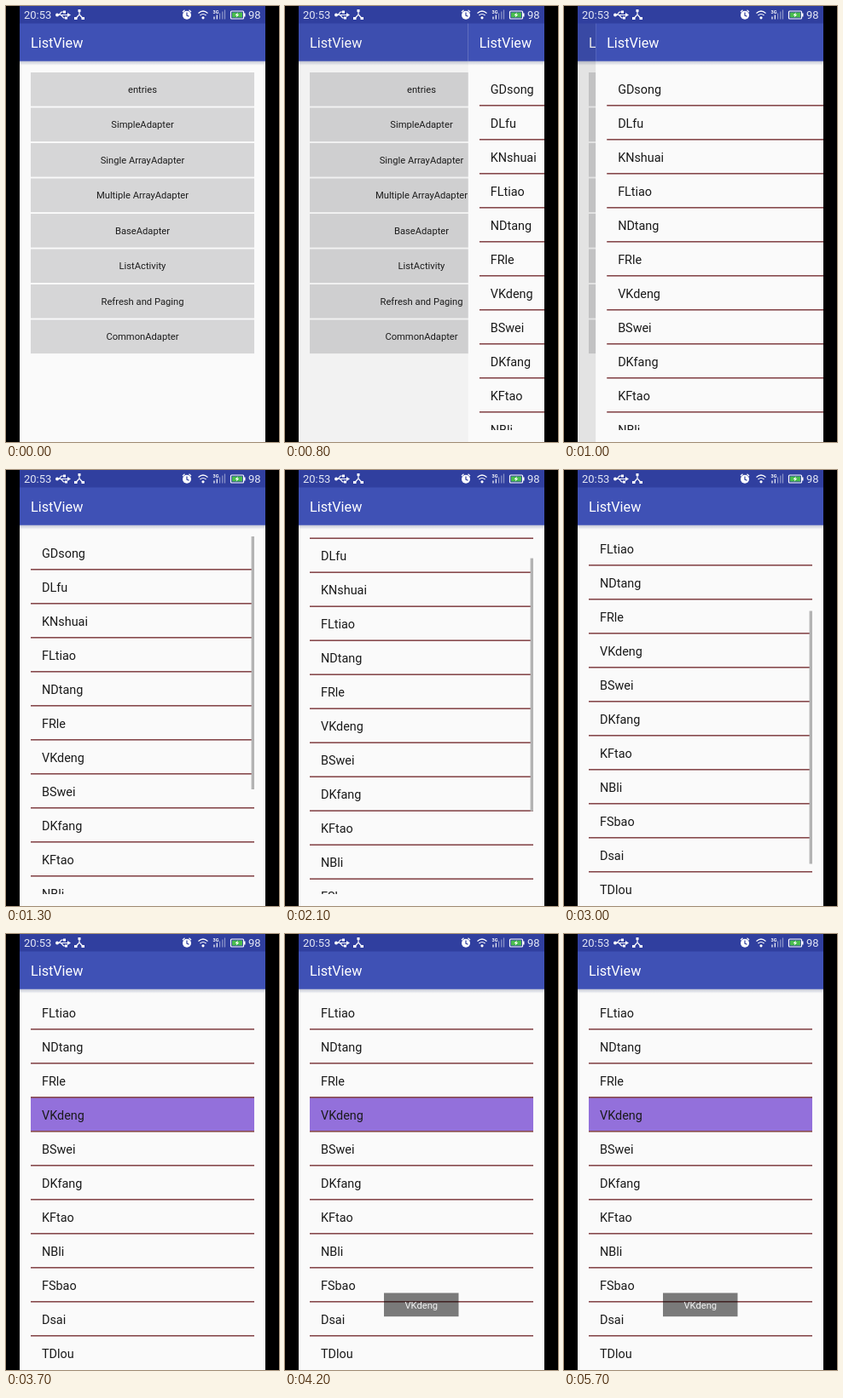
Recreate the animation shown at these times as an HTML page. Size 320 by 512 pixels, loop 5800 ms.

```html
<!DOCTYPE html>
<html lang="en">
<head>
<meta charset="utf-8">
<title>ListView</title>
<style>
  html, body { margin: 0; width: 100%; height: 100%; overflow: hidden; background: #000; }
  svg { display: block; width: 100vw; height: 100vh; font-family: Roboto, "Noto Sans", sans-serif; }
  .title { font-size: 16.2px; fill: #fff; }
  .button { font-size: 11.2px; fill: #1c1c1c; text-anchor: middle; }
  .row { font-size: 14.4px; fill: #1a1a1a; }
  .status { font-size: 13px; fill: #e4e7f5; }
  .icon { fill: none; stroke: #fff; stroke-width: 1.2; }
  .solid { fill: #fff; stroke: none; }
</style>
</head>
<body>
<svg viewBox="0 0 320 512">
  <defs>
    <linearGradient id="shade" x2="0" y2="1">
      <stop stop-color="#1a2a60" stop-opacity=".24"/>
      <stop offset="1" stop-color="#1a2a60" stop-opacity="0"/>
    </linearGradient>
    <clipPath id="phone"><rect x="16" width="288" height="512"/></clipPath>
    <clipPath id="listBox"><rect x="29" y="78" width="262" height="420"/></clipPath>
    <clipPath id="firstButton"><rect x="29" y="78" width="262" height="39.6"/></clipPath>
    <g id="page">
      <rect x="16" y="20" width="288" height="492" fill="#fafafa"/>
      <rect x="16" y="64.800" width="288" height="5" fill="url(#shade)"/>
      <rect x="16" y="20" width="288" height="44.800" fill="#3f51b5"/>
      <text class="title" x="29" y="49">ListView</text>
    </g>
  </defs>
  <rect width="320" height="512"/>
  <g clip-path="url(#phone)">
    <use href="#page"/>
    <g id="menu"></g>
    <circle id="ripple" cx="160" cy="98" clip-path="url(#firstButton)"/>
    <rect id="dim" x="16" y="20" width="288" height="492"/>
    <g id="screen">
      <use href="#page"/>
      <g clip-path="url(#listBox)">
        <g id="rows">
          <rect id="selected" x="29" width="262" height="40" fill="#9370db"/>
        </g>
        <rect id="scrollbar" x="287.6" width="3.4" height="297" fill="#b3b3b3"/>
      </g>
    </g>
    <g id="toast">
      <rect x="116" y="421.5" width="87.5" height="27.7" opacity=".51"/>
      <text x="159.8" y="440" font-size="11.2" fill="#f2f2f2" text-anchor="middle">VKdeng</text>
    </g>

    <rect x="16" width="288" height="20.5" fill="#303f9f"/>
    <text class="status" x="21" y="15">20:53</text>
    <text class="status" x="284" y="15">98</text>
    <g class="icon">
      <path d="M59 10.5H73M62 10.5l3-3.5h3M64.5 10.5l3 3.5h3"/>
      <circle class="solid" cx="60" cy="10.5" r="2"/>
      <path class="solid" d="M72 8l4 2.5-4 2.5zM67 5.5h3v3h-3zM69 12.5h3v3h-3z"/>
      <path d="M86 5v5l-4.5 5M86 10l4.5 5"/>
      <path class="solid" d="M84.5 4h3v3h-3zM80 13h3.5v3h-3.5zM88.5 13h3.5v3h-3.5z"/>
      <circle class="solid" cx="212" cy="10.7" r="5"/>
      <path d="M207 7l2.5-2.3M217 7l-2.5-2.3"/>
      <path d="M212 7.5v3.5l2.5 1.2" stroke="#303f9f"/>
      <path d="M225.5 8.5q5.5-5 11 0M227.5 11q3.5-3 7 0"/>
      <circle class="solid" cx="231" cy="13.8" r="1.6"/>
      <path d="M244 12.5v3M247.3 10.5v5"/>
      <path d="M250.6 8.5v7M253.8 6.5v9M256.5 4.5v11" opacity=".45"/>
      <text x="242.5" y="8.5" font-size="5.5" font-weight="700" class="solid">3G</text>
      <rect x="263.5" y="6" width="15" height="9" rx="1"/>
      <path class="solid" d="M279 8.5h1.5v4H279z"/>
      <path fill="#49bd4d" stroke="none" d="M265 7.5h12v6h-12z"/>
      <path class="solid" d="M272 7.5l-3.5 3.500h2l-.8 2.500 3.500-3.500h-2z"/>
    </g>
  </g>
</svg>
<script>
const LOOP = 5800, STEP = 100;
const ROW = 40, FIRST = 98, SCROLL_END = 125, SELECTED = 6;
const BUTTONS = ["entries", "SimpleAdapter", "Single ArrayAdapter", "Multiple ArrayAdapter",
  "BaseAdapter", "ListActivity", "Refresh and Paging", "CommonAdapter"];
const NAMES = ["GDsong", "DLfu", "KNshuai", "FLtiao", "NDtang", "FRle", "VKdeng",
  "BSwei", "DKfang", "KFtao", "NBli", "FSbao", "Dsai", "TDlou"];

const $ = id => document.getElementById(id);
const set = (el, attrs) => {
  for (const key in attrs) el.setAttribute(key, attrs[key]);
};
const add = (parent, tag, attrs, text = "") => {
  const el = document.createElementNS("http://www.w3.org/2000/svg", tag);
  set(el, attrs);
  el.textContent = text;
  parent.append(el);
};
const progress = (t, from, to) => Math.min(1, Math.max(0, (t - from) / (to - from)));
const smooth = p => p * p * (3 - 2 * p);

BUTTONS.forEach((label, i) => {
  const y = 78 + 41.5 * i;
  add($("menu"), "rect", { x: 29, y, width: 262, height: 39.6, fill: "#d6d6d7" });
  add($("menu"), "text", { class: "button", x: 160, y: y + 23.5 }, label);
});
NAMES.forEach((name, i) => {
  const y = FIRST + ROW * i;
  add($("rows"), "rect", { x: 29, y: y + 18, width: 262, height: 1.6, fill: "#87494c" });
  add($("rows"), "text", { class: "row", x: 42, y: y + 5 }, name);
});
set($("selected"), { y: FIRST + ROW * SELECTED - 21 });

function draw(t) {
  const press = progress(t, 200, 600);
  set($("ripple"), { r: 140 * press, opacity: 0.12 * (1 - progress(t, 500, 800)) });

  const slide = progress(t, 750, 1180);
  const left = 288 * (1 - slide) ** 3;
  set($("screen"), { transform: `translate(${left} 0)` });
  set($("dim"), { opacity: 0.1 * (1 - left / 288) });

  const scroll = SCROLL_END * smooth(progress(t, 1810, 2620));
  set($("rows"), { transform: `translate(0 ${-scroll})` });
  set($("scrollbar"), { y: 78 + 0.7 * scroll, opacity: 1 - progress(t, 3050, 3350) });

  set($("selected"), { opacity: t >= 3700 ? 1 : 0 });
  set($("toast"), { opacity: progress(t, 3750, 4150) });
}

const start = performance.now();
function tick() {
  const t = (performance.now() - start) % LOOP;
  draw(Math.floor(t / STEP) * STEP);
  requestAnimationFrame(tick);
}
draw(0);
requestAnimationFrame(tick);
</script>
</body>
</html>
```
